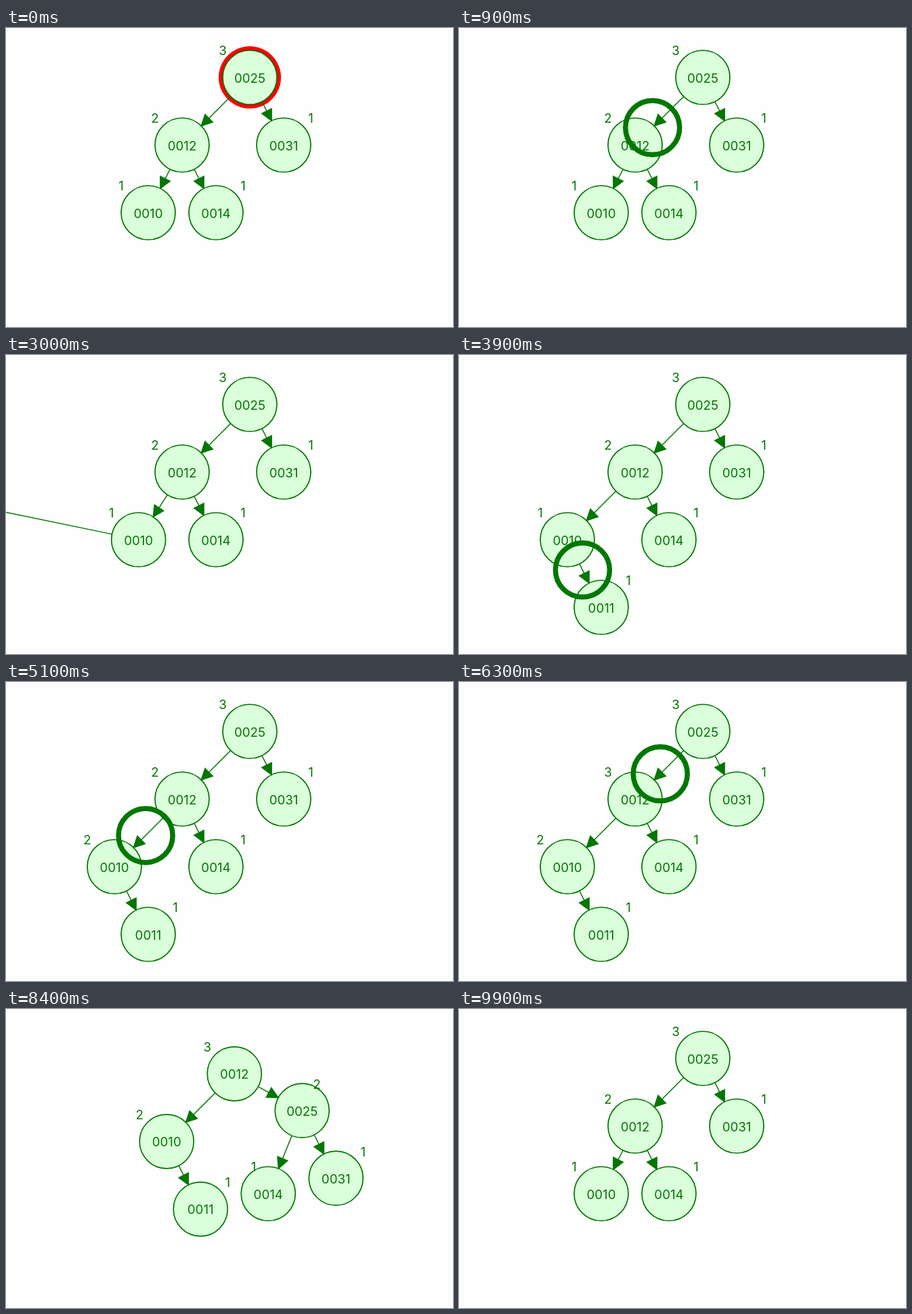
Animation of 660x442 px, one loop 10000 ms. Source, as an HTML page with a canvas:

```html
<!DOCTYPE html>
<html lang="en">
<head>
<meta charset="utf-8">
<title>Balanced tree insertion</title>
<style>
  html, body { margin: 0; width: 100%; height: 100%; overflow: hidden; background: #fefefe; }
  canvas { display: block; width: 660px; height: 442px; }
</style>
</head>
<body>
<canvas id="stage" width="660" height="442"></canvas>
<script>
const ctx = document.getElementById('stage').getContext('2d');
const LOOP = 10000, MOVE = 540, PULSE = 1590, R = 40;
const GREEN = '#007700', FILL = '#dbfedb', RED = '#ff0000';

// Each node: x, y, label x, label y
const before = {
  25: [360, 73, 320, 33], 12: [260, 173, 220, 133], 31: [410, 173, 450, 133],
  10: [210, 273, 170, 233], 14: [310, 273, 350, 233], 11: [-580, 73, -480, 133]
};
const inserted = { ...before, 10: [160, 273, 120, 233], 11: [210, 373, 250, 333] };
const rotated = {
  25: [460, 173, 500, 133], 12: [360, 73, 320, 33], 31: [510, 273, 550, 233],
  10: [260, 173, 220, 133], 14: [410, 273, 370, 233], 11: [310, 273, 350, 233]
};

const treeLinks = [[25, 12], [25, 31], [12, 10], [12, 14]];
const longLinks = [...treeLinks, [10, 11]];
const turnedLinks = [[12, 10], [12, 25], [25, 14], [25, 31], [10, 11]];

const steps = [
  { at: 0, mark: 25 },
  { at: 500, ring: [25, 12] },
  { at: 1115, mark: 12 },
  { at: 1727, ring: [12, 10] },
  { at: 2287, mark: 10 },
  { at: 2846, from: before, pose: inserted, links: longLinks },
  { at: 3603, ring: [11, 10] },
  { at: 4227, height: [10, 2] },
  { at: 4852, ring: [10, 12] },
  { at: 5476, height: [12, 3] },
  { at: 6100, ring: [12, 25] },
  { at: 6728, height: [25, 4] },
  { at: 7356, hotLink: true },
  { at: 7984, from: inserted, pose: rotated, links: turnedLinks, heights: { 25: 2 } },
  { at: 9600, reset: true }
];

const mix = (a, b, p) => a + (b - a) * p;

function stateAt(t) {
  const start = () => ({ pose: before, links: treeLinks, heights: { 25: 3, 12: 2, 31: 1, 10: 1, 14: 1, 11: 1 } });
  let state = start(), step;
  for (const s of steps) {
    if (s.at > t) break;
    step = s;
    if (s.reset) state = start();
    if (s.pose) Object.assign(state, { pose: s.pose, links: s.links });
    if (s.heights) Object.assign(state.heights, s.heights);
    if (s.height) state.heights[s.height[0]] = s.height[1];
  }
  const p = Math.min(1, (t - step.at) / MOVE);
  if (step.from) {
    const pose = {};
    for (const id in step.pose) pose[id] = step.pose[id].map((v, i) => mix(step.from[id][i], v, p));
    state.pose = pose;
  }
  return { ...state, step, p };
}

function disc(x, y, r) {
  ctx.beginPath();
  ctx.arc(x, y, r, 0, Math.PI * 2);
}

function text(str, x, y, color) {
  ctx.fillStyle = color;
  ctx.fillText(str, x, y);
}

function drawNode(id, [x, y], glow) {
  if (glow) {
    ctx.fillStyle = RED;
    disc(x, y, R + glow);
    ctx.fill();
  }
  ctx.fillStyle = FILL;
  ctx.strokeStyle = GREEN;
  ctx.lineWidth = 1.7;
  disc(x, y, R);
  ctx.fill();
  ctx.stroke();
  text(String(id).padStart(4, '0'), x, y + 7.5, GREEN);
}

function drawArrow(a, b, color, width) {
  const angle = Math.atan2(b[1] - a[1], b[0] - a[0]);
  const length = Math.hypot(b[0] - a[0], b[1] - a[1]);
  ctx.save();
  ctx.translate(a[0], a[1]);
  ctx.rotate(angle);
  ctx.strokeStyle = ctx.fillStyle = color;
  ctx.lineWidth = width;
  const tip = length - R;
  ctx.beginPath();
  ctx.moveTo(R, 0);
  ctx.lineTo(tip, 0);
  ctx.stroke();
  ctx.beginPath();
  ctx.moveTo(tip, 0);
  ctx.lineTo(tip - 16, 8);
  ctx.lineTo(tip - 16, -8);
  ctx.closePath();
  ctx.fill();
  ctx.stroke();
  ctx.restore();
}

function draw(t) {
  const { pose, links, heights, step, p } = stateAt(t);
  const wave = Math.abs((t / PULSE * 8 + 4) % 8 - 4);
  const glow = 6 + 2 * wave;

  ctx.fillStyle = '#fefefe';
  ctx.fillRect(0, 0, 660, 442);
  ctx.font = '18.7px Inter, sans-serif';
  ctx.textAlign = 'center';

  for (const id in pose) {
    if (+id !== step.mark) drawNode(id, pose[id]);
  }
  if (step.mark) drawNode(step.mark, pose[step.mark], glow);

  for (const id in pose) {
    const hot = step.height && step.height[0] === +id;
    text(heights[id], pose[id][2], pose[id][3] + 7.3, hot ? RED : GREEN);
  }

  for (const [a, b] of links) {
    if (step.hotLink && a === 25 && b === 12) drawArrow(pose[a], pose[b], RED, glow);
    drawArrow(pose[a], pose[b], GREEN, 1.5);
  }

  if (step.ring) {
    const [a, b] = step.ring.map(id => pose[id]);
    ctx.strokeStyle = GREEN;
    ctx.lineWidth = 7.5;
    disc(mix(a[0], b[0], p), mix(a[1], b[1], p), R);
    ctx.stroke();
  }
}

function tick() {
  draw(performance.now() % LOOP);
  requestAnimationFrame(tick);
}
tick();
</script>
</body>
</html>
```
